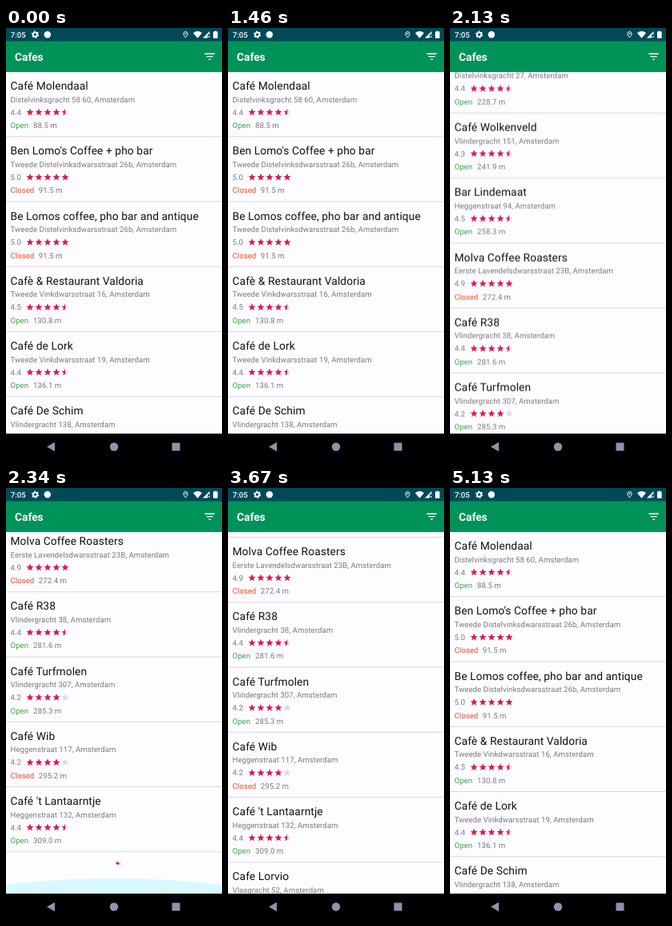
Write an HTML page that moves like this. It is 270 px wide and 540 px high and loops after 5.17 s.

```html
<!DOCTYPE html>
<html lang="en">
<head>
<meta charset="utf-8">
<title>Cafes</title>
<style>
  html, body { margin: 0; width: 100%; height: 100%; overflow: hidden; background: #fdfdff; }
  #stage { display: block; width: 100vw; height: 100vh; font-family: Roboto, "Noto Sans", sans-serif; text-rendering: geometricPrecision; }
  .name { font-size: 13.75px; letter-spacing: .1px; fill: #111; }
  .info { font-size: 9.625px; letter-spacing: .04px; fill: #7b7980; }
  .open { fill: #43a047; }
  .closed { fill: #f04a30; }
  .full { fill: #d91c50; }
  .none { fill: #d9d7f6; }
  .rule { fill: #d7d2f6; }

  #list, .glow, #wait, #ring, #more { animation: 5170ms linear infinite; }
  #list { animation-name: scroll; }
  #wait { animation-name: wait; }
  #more { animation-name: more; }
  #ring { animation-name: ring; }
  .glow { fill: #00e5ff; opacity: 0; }
  #low { animation-name: low; }
  #top { animation-name: top; }

  /* The fling advances in whole screen refreshes, hence the steps. */
  @keyframes scroll {
    0% { transform: translateY(0); animation-timing-function: step-end; }
    34.7% { transform: translateY(-30px); animation-timing-function: step-end; }
    35.5% { transform: translateY(-85px); animation-timing-function: step-end; }
    36.3% { transform: translateY(-158px); animation-timing-function: steps(9); }
    43.6% { transform: translateY(-818.5px); animation-timing-function: step-end; }
    70.9% { transform: translateY(-805.5px); animation-timing-function: step-end; }
    71.75% { transform: translateY(-740px); animation-timing-function: step-end; }
    72.55% { transform: translateY(-620px); animation-timing-function: steps(4); }
    75.8%, 100% { transform: translateY(0); }
  }
  @keyframes wait {
    0% { visibility: visible; animation-timing-function: step-end; }
    57.3%, 100% { visibility: hidden; animation-timing-function: step-end; }
  }
  @keyframes more {
    0% { visibility: hidden; animation-timing-function: step-end; }
    57.3% { visibility: visible; animation-timing-function: step-end; }
    80%, 100% { visibility: hidden; animation-timing-function: step-end; }
  }
  @keyframes ring {
    0%, 44.4% { stroke-dasharray: 4.5 100; transform: rotate(-80deg); animation-timing-function: cubic-bezier(.4, 0, .2, 1); }
    57.3%, 100% { stroke-dasharray: 75 100; transform: rotate(28deg); }
  }
  @keyframes low {
    0%, 43.6% { opacity: 0; transform: scaleY(0); }
    45.2%, 45.9% { opacity: .15; transform: scaleY(.35); }
    47% { opacity: .15; transform: scaleY(.42); animation-timing-function: ease-out; }
    58%, 100% { opacity: 0; transform: scaleY(0); }
  }
  @keyframes top {
    0%, 75.8% { opacity: 0; transform: scaleY(0); }
    78.1%, 79.8% { opacity: .15; transform: scaleY(.67); animation-timing-function: ease-out; }
    90.8%, 100% { opacity: 0; transform: scaleY(0); }
  }
</style>
</head>
<body>
<svg id="stage" viewBox="0 0 270 540" preserveAspectRatio="none">
  <defs>
    <path id="star" d="M12 17.27L18.18 21l-1.64-7.03L22 9.24l-7.19-.61L12 2 9.19 8.63 2 9.24l5.46 4.73L5.82 21z"/>
    <linearGradient id="half">
      <stop offset=".5" stop-color="#d91c50"/>
      <stop offset=".5" stop-color="#d9d7f6"/>
    </linearGradient>
    <linearGradient id="shade" x2="0" y2="1">
      <stop stop-color="#000" stop-opacity=".1"/>
      <stop offset="1" stop-color="#000" stop-opacity="0"/>
    </linearGradient>
  </defs>
  <rect width="270" height="540" fill="#fdfdff"/>

  <svg y="55" width="270" height="452" overflow="hidden">
    <g id="list">
      <g id="rows"></g>
      <g id="more"></g>
      <g id="wait" transform="translate(135 1244.75)">
        <circle id="ring" r="13" pathLength="100" fill="none" stroke="#d91c50" stroke-width="2.75"/>
      </g>
    </g>
    <g transform="translate(94 0)"><circle id="top" class="glow" cy="-350.7" r="405"/></g>
    <g transform="translate(135 452)"><circle id="low" class="glow" cy="350.7" r="405"/></g>
  </svg>

  <rect y="55" width="270" height="2" fill="url(#shade)"/>
  <rect width="270" height="55" fill="#009359"/>
  <rect width="270" height="16.5" fill="#004a58"/>
  <text x="11" y="41.2" font-size="13.75" font-weight="700" fill="#fff">Cafes</text>
  <path transform="translate(246.4 27.4) scale(.6875)" fill="#fff" d="M10 18h4v-2h-4zM3 6v2h18V6zM6 13h12v-2H6z"/>

  <g fill="#fff">
    <text x="5.8" y="11.8" font-size="9.6" font-weight="500">7:05</text>
    <circle cx="36.5" cy="8.2" r="2.6" fill="none" stroke="#fff" stroke-width="1.9"/>
    <circle cx="36.5" cy="8.2" r="3.9" fill="none" stroke="#fff" stroke-width="1.4" stroke-dasharray="2 2.08"/>
    <circle cx="51.8" cy="8.2" r="4.2"/>
    <path d="M224.5 12c-1.800-2.300-2.600-3.600-2.600-4.800a2.600 2.600 0 0 1 5.200 0c0 1.200-.8 2.500-2.600 4.800z" fill="none" stroke="#fff"/>
    <circle cx="224.5" cy="7.2" r=".9"/>
    <path d="M234 6.2q5.500-4.200 11 0l-5.500 6.500z"/>
    <path d="M254.500 4v4h-2.500v4.500h-6z"/>
    <path d="M252.500 9.500l2.500 2.500m0-2.500l-2.500 2.500" stroke="#fff" stroke-width=".8"/>
    <path d="M259 4.600h1.600v-.9h2.400v.9h1.600v8.100H259z"/>
  </g>

  <rect y="507" width="270" height="33" fill="#000"/>
  <g fill="#968fac">
    <path d="M51 523.5l10-5.700v11.400z"/>
    <circle cx="135" cy="523.5" r="5.200"/>
    <rect x="207.500" y="518.500" width="10" height="10" rx=".6"/>
  </g>
</svg>

<script>
  const PITCH = 81.25;
  // name, address, rating, open, metres
  const cafes = [
    ["Café Molendaal", "Distelvinksgracht 58 60", 4.4, 1, 88.5],
    ["Ben Lomo's Coffee + pho bar", "Tweede Distelvinksdwarsstraat 26b", 5, 0, 91.5],
    ["Be Lomos coffee, pho bar and antique", "Tweede Distelvinksdwarsstraat 26b", 5, 0, 91.5],
    ["Cafè & Restaurant Valdoria", "Tweede Vinkdwarsstraat 16", 4.5, 1, 130.8],
    ["Café de Lork", "Tweede Vinkdwarsstraat 19", 4.4, 1, 136.1],
    ["Café De Schim", "Vlindergracht 138", 4.3, 1, 203.2],
    ["De Drie Mereltjes", "Vlindergracht 126", 4.5, 0, 216.5],
    ["'t Vlonder", "Distelvinksgracht 27", 4.4, 1, 228.7],
    ["Café Wolkenveld", "Vlindergracht 151", 4.3, 1, 241.9],
    ["Bar Lindemaat", "Heggenstraat 94", 4.5, 1, 258.3],
    ["Molva Coffee Roasters", "Eerste Lavendelsdwarsstraat 23B", 4.9, 0, 272.4],
    ["Café R38", "Vlindergracht 38", 4.4, 1, 281.6],
    ["Café Turfmolen", "Vlindergracht 307", 4.2, 1, 285.3],
    ["Café Wib", "Heggenstraat 117", 4.2, 0, 295.2],
    ["Café 't Lantaarntje", "Heggenstraat 132", 4.4, 1, 309],
    ["Cafe Lorvio", "Vlasgracht 52", 4.3, 1, 314.6]
  ];
  const FIRST_PAGE = 15;

  const esc = s => s.replace(/&/g, "&amp;");
  const text = (x, y, cls, s) => `<text x="${x}" y="${y}" class="${cls}">${esc(s)}</text>`;

  function stars(rating) {
    const filled = Math.round(rating * 2) / 2;
    let out = "";
    for (let i = 0; i < 5; i++) {
      const left = filled - i;
      const paint = left >= 1 ? 'class="full"' : left > 0 ? 'fill="url(#half)"' : 'class="none"';
      out += `<use href="#star" ${paint} transform="translate(${24.5 + 11 * i} 44.7) scale(.4583)"/>`;
    }
    return out;
  }

  function row([name, address, rating, open, metres], i) {
    return `<g transform="translate(0 ${i * PITCH})">` +
      text(5.5, 22, "name", name) +
      text(5.5, 37.6, "info", address + ", Amsterdam") +
      text(5.5, 53.7, "info", rating.toFixed(1)) + stars(rating) +
      text(5.5, 70.1, "info " + (open ? "open" : "closed"), open ? "Open" : "Closed") +
      text(open ? 34 : 40.8, 70.1, "info", metres.toFixed(1) + " m") +
      `<rect class="rule" y="80.3" width="270" height=".95"/></g>`;
  }

  const html = cafes.map(row);
  document.getElementById("rows").innerHTML = html.slice(0, FIRST_PAGE).join("");
  document.getElementById("more").innerHTML = html.slice(FIRST_PAGE).join("");
</script>
</body>
</html>
```
